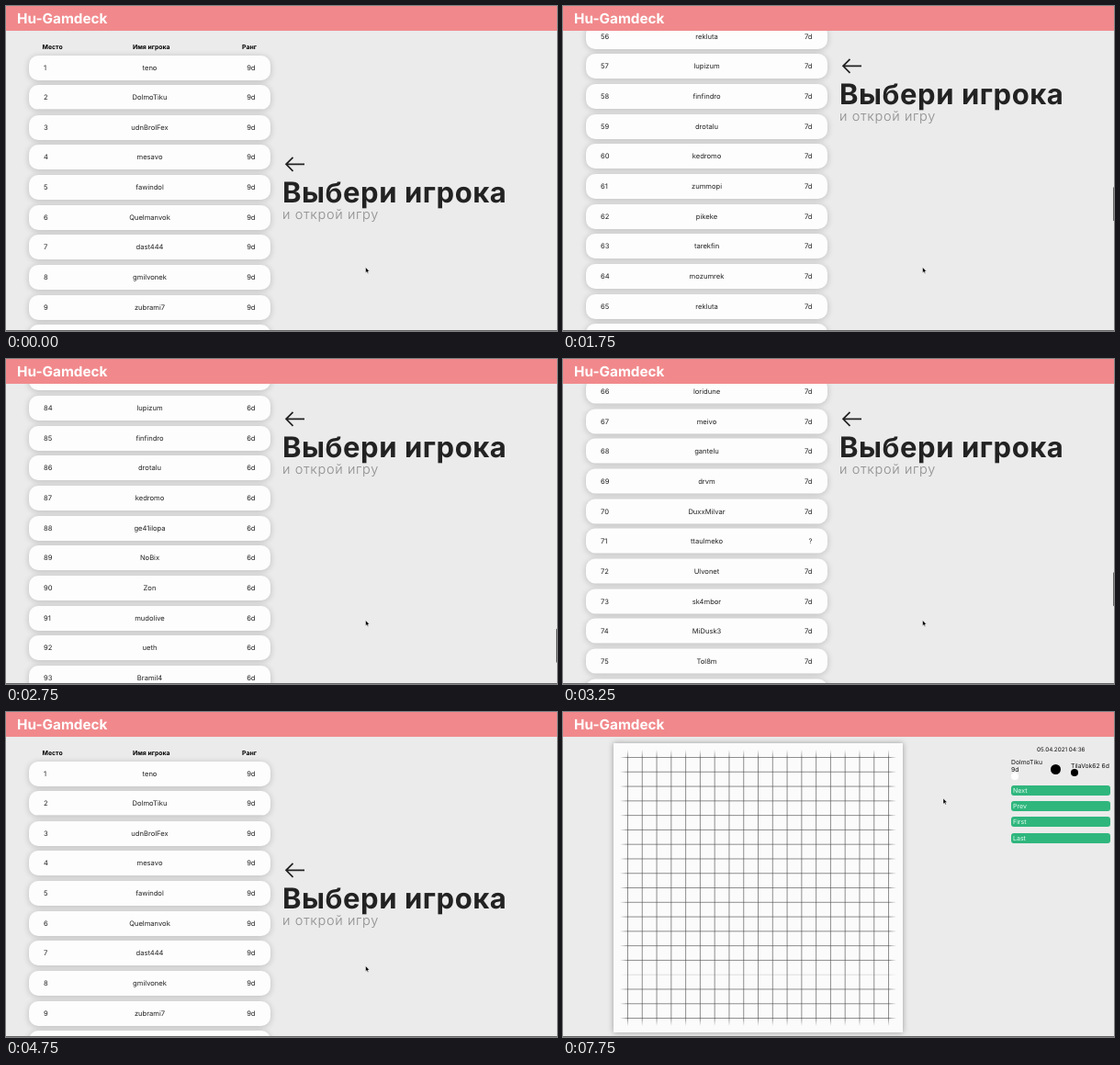
Animation, 600 px wide and 354 px high, one loop 8000 ms. Source, as an HTML page:

```html
<!DOCTYPE html>
<html lang="ru">
<head>
<meta charset="utf-8">
<title>Hu-Gamdeck</title>
<style>
html, body { margin: 0; width: 100%; height: 100%; overflow: hidden; background: #ebebeb; }
body { position: relative; font: 7.6px/27px Inter, "Open Sans", sans-serif; color: #222; text-rendering: geometricPrecision; }
div, span, svg, h1, h2, p { position: absolute; margin: 0; white-space: nowrap; }
svg { overflow: visible; }
#stage { width: 600px; height: 354px; overflow: hidden; }
#bar { width: 600px; height: 27px; background: #f1898c; }
#bar h1 { left: 12px; font-size: 15.3px; color: #fff; }
#edge { top: 353px; width: 600px; height: 1px; background: #666; }
#thumb { left: 598.5px; width: 2px; height: 37px; border-radius: 1px; background: #666; }

#list { left: 25px; top: 53.5px; width: 263px; }
#list b { position: absolute; top: -23px; font-size: 6.9px; color: #000; }
.row { position: relative; height: 27px; margin-bottom: 5.66px; border-radius: 10px;
  background: #fdfdfd; box-shadow: 0 1px 7px rgba(0, 0, 0, .2); overflow: hidden; }
.place { left: 16px; }
.name { left: 0; width: 263px; text-align: center; }
.rank { right: 16.5px; }
.rule { left: 5px; top: 25.5px; width: 253px; height: 1px; background: #ddd; }
.game { left: 26px; width: 211px; height: 25px; line-height: 25px; border-radius: 7px; background: #ebebeb; color: #aaa; }
.game i { font-style: normal; color: #222; }

#prompt { left: 301px; top: 0; }
#prompt h2 { top: 184px; font-size: 31px; line-height: 40px; letter-spacing: .55px; }
#prompt p { top: 218px; font-size: 14.5px; line-height: 20px; letter-spacing: .65px; font-weight: 300; color: #8c8c8c; }

#board { left: 54.5px; top: 33.5px; width: 315.5px; height: 315.5px; background: #fbfbfb; box-shadow: 0 0 6px rgba(0, 0, 0, .35); }
#grid { left: 7.5px; top: 7.5px; --fade: transparent, #000 8px, #000 calc(100% - 8px), transparent;
  mask: linear-gradient(var(--fade)) intersect, linear-gradient(90deg, var(--fade)); }
#info { font-size: 6.8px; line-height: 8px; color: #111; }
#info div { border-radius: 50%; }
.button { left: 488px; width: 106px; height: 11px; padding-left: 2px; border-radius: 3px;
  background: #2fb67d; color: #e5fff2; font-size: 7px; line-height: 11px; }
</style>
</head>
<body>
<div id="stage">
  <div id="lobby">
    <div id="list">
      <b style="left:14.5px">Место</b><b style="left:113px">Имя игрока</b><b style="left:232px">Ранг</b>
    </div>
    <div id="prompt">
      <svg width="30" height="20" style="left:3px;top:162px" fill="none" stroke="#222" stroke-width="1.7">
        <path d="M21 10.3H1M8.5 2.8 1 10.3l7.5 7.5"/>
      </svg>
      <h2>Выбери игрока</h2>
      <p>и открой игру</p>
    </div>
  </div>
  <div id="match">
    <div id="board">
      <svg id="grid" width="301" height="301" stroke="#4a4a4a" stroke-width=".62">
        <path id="lines"/>
        <path id="faintLine" opacity=".25"/>
      </svg>
    </div>
    <div id="info">
      <span style="left:516px;top:36.5px;font-size:6.3px">05.04.2021 04:36</span>
      <span style="left:488px;top:50.5px">DolmoTiku<br>9d</span>
      <span style="left:553px;top:54.5px">TilaVok62 6d</span>
    </div>
  </div>
  <div id="bar"><h1>Hu-Gamdeck</h1></div>
  <div id="thumb"></div>
  <div id="edge"></div>
  <svg id="cursor" width="10" height="10" stroke-linejoin="round">
    <path id="arrow" d="M0 0V6.2L1.4 5l1 2.1 1-.5-1-2H4.3Z" fill="#000" stroke="#fff" stroke-width=".5"/>
    <path id="hand" transform="scale(.8)" d="M.3 .3Q1 -.3 1.6 .4L2 2.6 5 3.2Q5.8 3.5 5.6 4.6L4.8 7.6H1L-1.4 4.7Q-1.4 3.7 -.4 4.2L.4 4.8Z" fill="#fff" stroke="#333" stroke-width=".8"/>
  </svg>
</div>
<script>
const LOOP = 8000, FPS = 12, MAX_SCROLL = 2940;
const $ = id => document.getElementById(id);

function add(parent, className, text = "", style = {}, tag = "div") {
  const node = document.createElement(tag);
  node.className = className;
  node.textContent = text;
  for (const key in style) node.style.setProperty(key, typeof style[key] === "number" ? style[key] + "px" : style[key]);
  return parent.appendChild(node);
}

// Player names by the place at which each run begins
const runs = {
  1: "teno DolmoTiku udnBrolFex mesavo fawindol Quelmanvok dast444 gmilvonek zubrami7",
  25: "tavatava fernmilk VumoRi5172 EO8K Q7 pelko38 QDWLumoVik Quolmi QDWLumo006 Wandorn",
  66: "loridune meivo gantelu drvm DuxxMilvar ttaulmeko Ulvonet sk4mbor MiDusk3 Tol8m",
  88: "ge41ilopa NoBix Zon mudolive ueth Bramil4 sulko plushdorn GavitoN olunek305"
};
const names = [];
for (const start in runs) runs[start].split(" ").forEach((name, i) => names[+start + i] = name);

const syllables = ["ta", "mo", "rek", "lu", "fin", "dro", "ke", "zum", "pi"];
const makeName = n => [n, n * 5 + 2, n * 7 + 4].map(k => syllables[k % 9]).join("");
const rankOf = n => n === 71 ? "?" : (n < 21 ? 9 : n < 51 ? 8 : n < 82 ? 7 : 6) + "d";

const rows = [];
for (let n = 1; n <= 100; n++) {
  const row = rows[n] = add($("list"), "row");
  add(row, "place", n, {}, "span");
  add(row, "name", names[n] || makeName(n), {}, "span");
  add(row, "rank", rankOf(n), {}, "span");
}

const openRow = rows[2];
add(openRow, "rule");
["04/05/2021", "04/03/2021"].forEach((date, i) => {
  const game = add(openRow, "game", "", { top: 33 + 28 * i });
  add(game, "", "vs ", { left: 8 }, "span").append(add(game, "", "TilaVok62", {}, "i"));
  add(game, "", "W", { left: 101 }, "span");
  add(game, "", date, { right: 8 }, "span");
});

let lines = "";
for (let i = 0; i < 19; i++) {
  const at = 8.5 + i * 15.78;
  lines += `M${at} 0V301`;
  if (i === 15) $("faintLine").setAttribute("d", `M0 ${at}H301`);
  else lines += `M0 ${at}H301`;
}
$("lines").setAttribute("d", lines);

for (const [x, y, size, color] of [[531, 57, 11, "#000"], [553, 62, 8, "#000"], [488, 66, 8, "#fff"]])
  add($("info"), "", "", { left: x, top: y, width: size, height: size, background: color });
["Next", "Prev", "First", "Last"].forEach((label, i) =>
  add($("match"), "button", label, { top: 80 + 17.2 * i }));

const linear = p => p;
const easeIn = p => p ** 1.4;
const easeOut = p => 1 - (1 - p) ** 2;
const smooth = p => p * p * (3 - 2 * p);

// Each key is [time, values, easing towards this key]
const scrollKeys = [[700, [0]], [1250, [805], easeIn], [2250, [2855], linear], [2420, [MAX_SCROLL], easeOut],
  [3250, [2154.5], easeIn], [4250, [0], easeOut]];
const openKeys = [[5420, [0]], [5840, [1], smooth]];
const cursorKeys = [[4600, [391.5, 284.5]], [4750, [391.5, 276.5], easeIn], [4833, [384, 197], linear],
  [5340, [238, 100.5], easeOut], [6260, [238, 100.5], linear], [6670, [109, 129.5], smooth],
  [7260, [109, 129.5], linear], [7750, [414, 94], smooth]];

function track(keys, t) {
  const next = keys.findIndex(key => key[0] > t);
  if (next === 0) return keys[0][1];
  if (next < 0) return keys[keys.length - 1][1];
  const [t0, from] = keys[next - 1], [t1, to, ease] = keys[next];
  const p = ease((t - t0) / (t1 - t0));
  return from.map((v, i) => v + (to[i] - v) * p);
}

const show = (id, on) => $(id).style.display = on ? "" : "none";
const move = (id, x, y) => $(id).style.transform = `translate(${x}px, ${y}px)`;

function draw(t) {
  const [scroll] = track(scrollKeys, t);
  const [open] = track(openKeys, t);
  const [x, y] = track(cursorKeys, t);
  const playing = t >= 7000;

  show("lobby", !playing);
  show("match", playing);
  show("info", t >= 7080);
  move("list", 0, -scroll);
  move("prompt", 0, -Math.min(scroll, 107));
  openRow.style.height = 27 + 66 * open + "px";

  show("thumb", t > 700 && t < 4600);
  move("thumb", 0, scroll * .1078);

  const pointing = !playing && x < 288;
  show("hand", pointing);
  show("arrow", !pointing);
  move("cursor", x, y);
}

const start = performance.now();
function tick() {
  const t = (performance.now() - start) % LOOP;
  draw(Math.floor(t * FPS / 1000 + 1e-6) * 1000 / FPS);
  requestAnimationFrame(tick);
}
tick();
</script>
</body>
</html>
```
